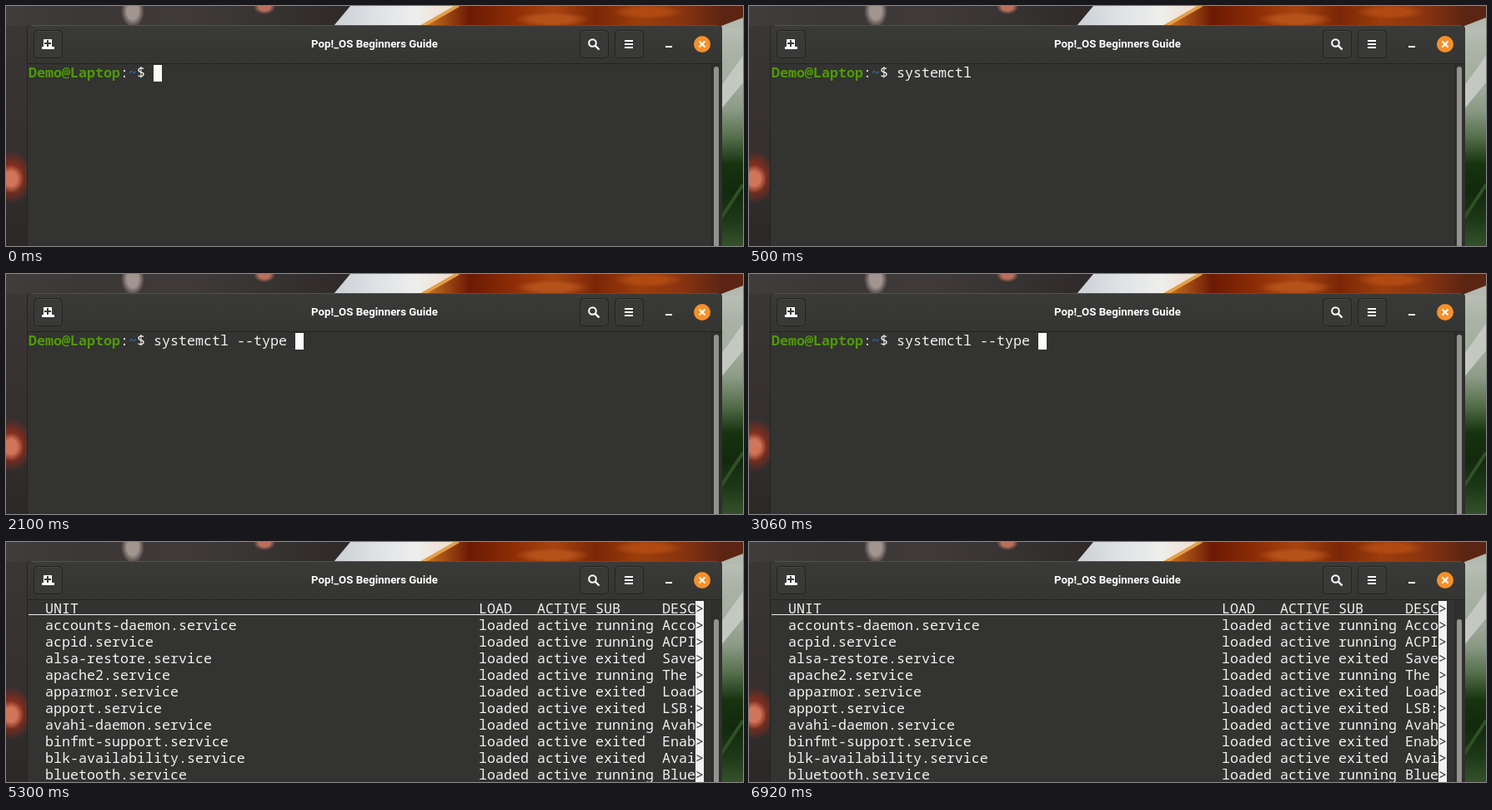
An HTML page with a canvas for the animation above (8000 ms loop, 884x289 px).

```html
<!DOCTYPE html>
<html lang="en">
<head>
<meta charset="utf-8">
<title>Terminal</title>
<style>
  html, body { margin: 0; width: 100%; height: 100%; overflow: hidden; background: #333; }
  canvas { display: block; }
</style>
</head>
<body>
<canvas id="stage" width="884" height="289"></canvas>
<script>
const ctx = document.getElementById('stage').getContext('2d');
const W = 884, H = 289, LOOP = 8000;
const CELL = 10, ROW = 20, LEFT = 27, TOP = 71;
const MONO = '16.667px "Noto Sans Mono", "DejaVu Sans Mono", monospace';
const WHITE = '#f2f2f2', PAPER = '#333331', BUTTON = '#393a37';

const PROMPT = [['Demo@Laptop', '#4e9a06', true], [':', WHITE], ['~', '#3465a4', true], ['$', WHITE]];
const STEPS = [
  { at: 0, text: '', cursor: true },
  { at: 500, text: 'systemctl' },
  { at: 2100, text: 'systemctl --type ', cursor: true },
  { at: 3700, text: 'systemctl --type service' },
  { at: 5300, list: true }
];
const UNITS = [
  ['accounts-daemon', 'running', 'Acco'],
  ['acpid', 'running', 'ACPI'],
  ['alsa-restore', 'exited', 'Save'],
  ['apache2', 'running', 'The'],
  ['apparmor', 'exited', 'Load'],
  ['apport', 'exited', 'LSB:'],
  ['avahi-daemon', 'running', 'Avah'],
  ['binfmt-support', 'exited', 'Enab'],
  ['blk-availability', 'exited', 'Avai'],
  ['bluetooth', 'running', 'Blue']
];

function rect(x, y, w, h, color) {
  ctx.fillStyle = color;
  ctx.fillRect(x, y, w, h);
}

function round(x, y, w, h, r, fill, stroke) {
  ctx.beginPath();
  ctx.roundRect(x, y, w, h, r);
  if (fill) { ctx.fillStyle = fill; ctx.fill(); }
  if (stroke) { ctx.strokeStyle = stroke; ctx.lineWidth = 1; ctx.stroke(); }
}

function poly(color, ...pts) {
  ctx.beginPath();
  for (let i = 0; i < pts.length; i += 2) ctx.lineTo(pts[i], pts[i + 1]);
  ctx.fillStyle = color;
  ctx.fill();
}

function line(color, width, ...pts) {
  ctx.beginPath();
  for (let i = 0; i < pts.length; i += 4) {
    ctx.moveTo(pts[i], pts[i + 1]);
    ctx.lineTo(pts[i + 2], pts[i + 3]);
  }
  ctx.strokeStyle = color;
  ctx.lineWidth = width;
  ctx.stroke();
}

// Soft elliptical spot
function spot(x, y, rx, ry, color) {
  ctx.save();
  ctx.translate(x, y);
  ctx.scale(rx, ry);
  const g = ctx.createRadialGradient(0, 0, 0, 0, 0, 1);
  g.addColorStop(0, color);
  g.addColorStop(0.5, color);
  g.addColorStop(1, color + '00');
  ctx.fillStyle = g;
  ctx.fillRect(-1, -1, 2, 2);
  ctx.restore();
}

function gradient(x0, y0, x1, y1, ...colors) {
  const g = ctx.createLinearGradient(x0, y0, x1, y1);
  colors.forEach((c, i) => g.addColorStop(i / (colors.length - 1), c));
  return g;
}

function wallpaper() {
  // Dark table, top and left
  rect(0, 0, W, H, gradient(0, 0, 0, H, '#3d3838', '#383333', '#352f2f', '#2c2828'));
  rect(0, 0, 420, 24, gradient(0, 0, 420, 0, '#423d3d', '#3c3737', '#403a3a', '#383333', '#2e2828'));
  spot(152, 6, 14, 20, '#a2958f');
  spot(310, 1, 13, 9, '#b8705c');
  spot(7, 206, 25, 32, '#7f2e1f');
  spot(6, 208, 15, 17, '#d0755a');

  // Plate rim and sauce
  poly(gradient(400, 0, 540, 0, '#cdd2d6', '#dfe3e6', '#eeeeec', '#efdccb'),
    413, 0, 546, 0, 500, 24, 393, 24);
  poly(gradient(505, 0, 860, 0, '#c9701f', '#6b1a04', '#8c2c06', '#a84310', '#7a2606', '#9c3d0c', '#8a3410', '#5b2413'),
    540, 0, 884, 0, 884, 24, 496, 24);
  line('#e2a04a', 4, 543, -1, 498, 25);
  spot(655, 16, 45, 9, '#b5521a');
  spot(770, 7, 42, 9, '#b04a12');

  // Leaves, right
  poly('#b3b9ae', 884, 14, 884, 60, 858, 60, 858, 24);
  rect(858, 26, 26, 263, gradient(0, 26, 0, H,
    '#b8beb3', '#a9b2a5', '#a3ae9f', '#8b9a86', '#566f4c', '#17330f', '#12290e', '#1c3717', '#35512b'));
  poly('#c3c9c0', 884, 60, 884, 92, 858, 124, 858, 96);
  line('#2f5124', 4, 858, 255, 884, 215);
}

function button(x) {
  round(x + 0.5, 29.5, 34, 33, 4, BUTTON, '#232422');
  line('#454642', 1, x + 4, 30.5, x + 31, 30.5);
}

function titleBar() {
  round(25, 23, 834, 280, 5, '#232422');
  round(26, 23, 833, 60, [5, 5, 0, 0], gradient(0, 23, 0, 69, '#3a3b38', '#343532'));
  line('#51524e', 1, 31, 23.5, 854, 23.5);
  rect(26, 69, 833, 1, '#222321');

  [33, 688, 730].forEach(button);

  // New tab
  rect(45, 40, 10, 9, '#fff');
  rect(43, 49, 15, 3, '#fff');
  rect(46, 44, 8, 2, BUTTON);
  rect(49, 41, 2, 8, BUTTON);

  // Search
  ctx.beginPath();
  ctx.arc(703.5, 44.5, 4.3, 0, Math.PI * 2);
  ctx.strokeStyle = '#fff';
  ctx.lineWidth = 2;
  ctx.stroke();
  line('#fff', 2.4, 706.5, 47.5, 711.5, 52.5);

  // Menu, minimise, close
  [41, 45, 49].forEach(y => rect(742, y, 10, 2, '#fff'));
  rect(791, 48, 8, 2, '#fff');
  ctx.beginPath();
  ctx.arc(835, 46, 10, 0, Math.PI * 2);
  ctx.fillStyle = '#f7902a';
  ctx.fill();
  line('#fff', 2, 831.5, 42.5, 838.5, 49.5, 838.5, 42.5, 831.5, 49.5);

  ctx.font = 'bold 13.25px Roboto, "Open Sans", sans-serif';
  ctx.textAlign = 'center';
  ctx.fillStyle = '#fff';
  ctx.fillText('Pop!_OS Beginners Guide', 442, 50);
  ctx.textAlign = 'left';
}

function put(col, row, text, color = WHITE, bold = false) {
  ctx.font = (bold ? 'bold ' : '') + MONO;
  ctx.fillStyle = color;
  ctx.fillText(text, LEFT + col * CELL, TOP + row * ROW + 15);
}

function putRow(row, unit, load, active, sub, desc) {
  put(2, row, unit);
  put(54, row, load);
  put(61, row, active);
  put(68, row, sub);
  put(76, row, desc);
  put(80, row, '>', PAPER);
}

function commandLine(step) {
  let col = 0;
  for (const [text, color, bold] of PROMPT) {
    put(col, 0, text, color, bold);
    col += text.length;
  }
  col++;
  put(col, 0, step.text);
  if (step.cursor) rect(LEFT + (col + step.text.length) * CELL, TOP, CELL, ROW, '#fcfcfa');
}

function unitList() {
  rect(LEFT + 80 * CELL, TOP, CELL, H - TOP, WHITE);
  putRow(0, 'UNIT', 'LOAD', 'ACTIVE', 'SUB', 'DESC');
  rect(LEFT, TOP + 16, 80 * CELL, 1, WHITE);
  UNITS.forEach(([name, sub, desc], i) =>
    putRow(i + 1, name + '.service', 'loaded', 'active', sub, desc));
}

function terminal(step) {
  rect(26, 70, 833, H - 70, PAPER);
  rect(846, 70, 1, H - 70, '#292927');
  rect(847, 70, 12, H - 70, '#2f2f2d');
  round(849, step.list ? 93 : 73, 6, H, 3, '#92928f');
  if (step.list) unitList();
  else commandLine(step);
}

const start = performance.now();

function frame(now) {
  const t = Math.max(0, now - start) % LOOP;
  wallpaper();
  titleBar();
  terminal(STEPS.findLast(s => s.at <= t));
  requestAnimationFrame(frame);
}

frame(start);
</script>
</body>
</html>
```
